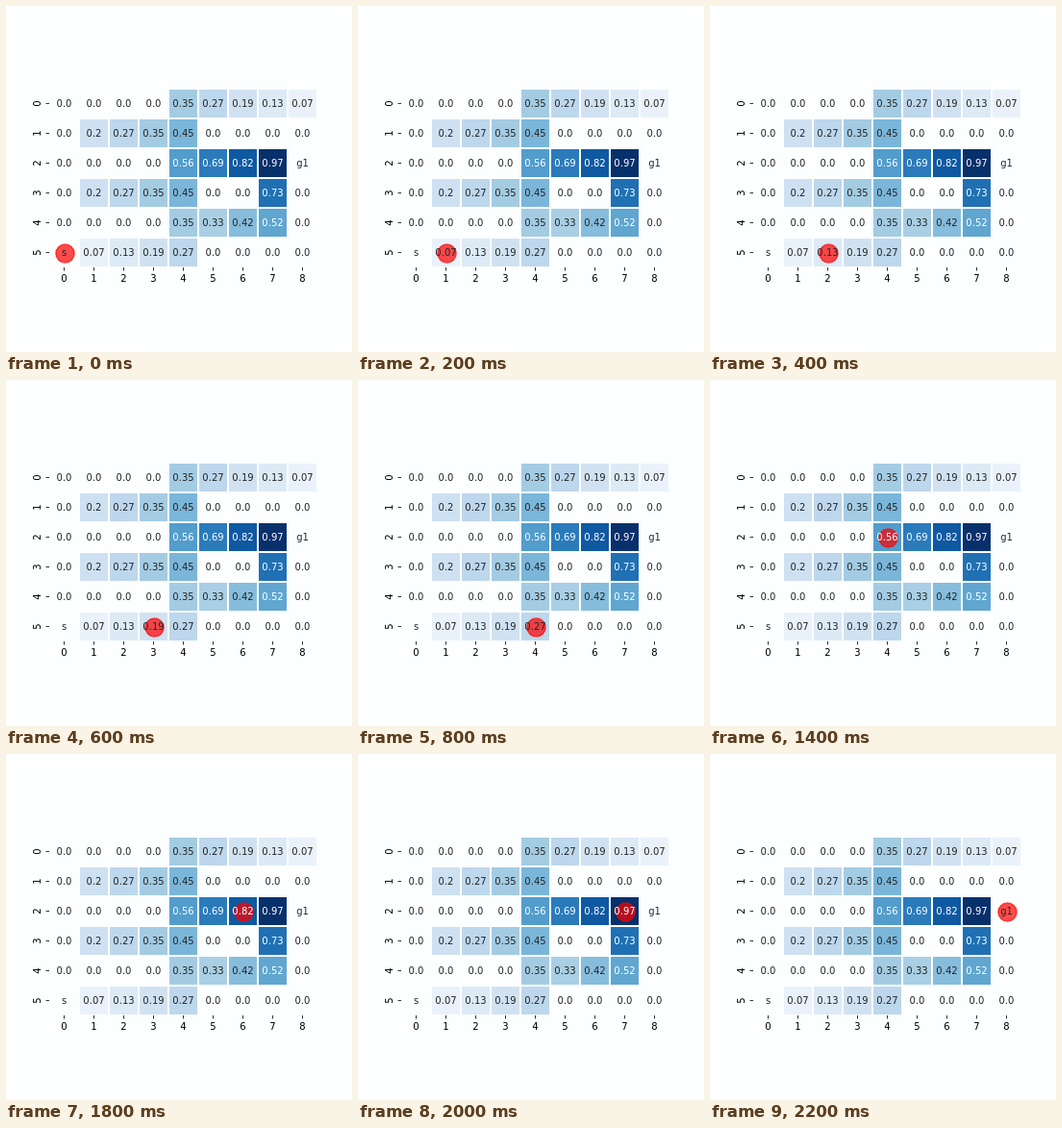
These frames come from a looping animation (360x360 px, 2400 ms). An HTML page:

```html
<!DOCTYPE html>
<html lang="en">
<head>
<meta charset="utf-8">
<title>Grid walk</title>
<style>
  html, body { margin: 0; width: 100%; height: 100%; overflow: hidden; background: #fcfeff; }
  svg { display: block; width: 360px; height: 360px; }
  text { font: 10px "DejaVu Sans", sans-serif; text-anchor: middle; }
</style>
</head>
<body>
<svg id="stage" viewBox="0 0 360 360" xmlns="http://www.w3.org/2000/svg"></svg>
<script>
const LEFT = 45, TOP = 86, CELL = 31, STEP_MS = 200;
const PAPER = '#fcfeff', INK = '#262626';
const stage = document.getElementById('stage');

const grid = `
0.0 0.0 0.0 0.0 0.35 0.27 0.19 0.13 0.07
0.0 0.2 0.27 0.35 0.45 0.0 0.0 0.0 0.0
0.0 0.0 0.0 0.0 0.56 0.69 0.82 0.97 g1
0.0 0.2 0.27 0.35 0.45 0.0 0.0 0.73 0.0
0.0 0.0 0.0 0.0 0.35 0.33 0.42 0.52 0.0
s 0.07 0.13 0.19 0.27 0.0 0.0 0.0 0.0
`.trim().split('\n').map(row => row.split(' '));

const blues = ['f7fbff', 'deebf7', 'c6dbef', '9ecae1', '6baed6', '4292c6', '2171b5', '08519c', '08306b']
  .map(hex => [0, 2, 4].map(i => parseInt(hex.slice(i, i + 2), 16)));

function shade(value) {
  const pos = value / 0.97 * (blues.length - 1);
  const i = Math.min(Math.floor(pos), blues.length - 2);
  const mix = blues[i].map((c, k) => Math.round(c + (blues[i + 1][k] - c) * (pos - i)));
  return `rgb(${mix.join(',')})`;
}

function add(tag, attrs, text = '') {
  const node = document.createElementNS(stage.namespaceURI, tag);
  for (const name in attrs) node.setAttribute(name, attrs[name]);
  node.textContent = text;
  return stage.appendChild(node);
}

const midX = col => LEFT + (col + 0.5) * CELL;
const midY = row => TOP + (row + 0.5) * CELL;

grid.forEach((row, r) => row.forEach((label, c) => {
  const value = parseFloat(label) || 0;
  if (value) {
    add('rect', { x: LEFT + c * CELL + 1, y: TOP + r * CELL + 1, width: CELL - 2, height: CELL - 2, fill: shade(value) });
  }
}));

const walker = add('circle', {
  r: 9.6, fill: '#f00', 'fill-opacity': 0.7,
  stroke: '#f00', 'stroke-width': 1.4, 'stroke-opacity': 0.7
});

// Labels sit above the walker.
grid.forEach((row, r) => row.forEach((label, c) => {
  add('text', { x: midX(c), y: midY(r) + 3.5, fill: parseFloat(label) > 0.5 ? PAPER : INK }, label);
}));

const bottom = TOP + grid.length * CELL;
for (let c = 0; c < grid[0].length; c++) {
  add('rect', { x: midX(c) - 0.5, y: bottom, width: 1, height: 3.5, fill: '#000', opacity: 0.8 });
  add('text', { x: midX(c), y: bottom + 15 }, c);
}
for (let r = 0; r < grid.length; r++) {
  add('rect', { x: LEFT - 3.5, y: midY(r) - 0.5, width: 3.5, height: 1, fill: '#000', opacity: 0.8 });
  add('text', { transform: `translate(36 ${midY(r)}) rotate(-90)` }, r);
}

// Four cells right, three up, four right.
const path = Array.from({ length: 12 }, (_, i) => [
  Math.min(i, 4) + Math.max(i - 7, 0),
  5 - Math.min(Math.max(i - 4, 0), 3)
]);

function draw(ms) {
  const [col, row] = path[Math.floor(ms / STEP_MS) % path.length];
  walker.setAttribute('cx', midX(col) + 1);
  walker.setAttribute('cy', midY(row) + 1);
}

const start = performance.now();
function tick() {
  draw(performance.now() - start);
  requestAnimationFrame(tick);
}
tick();
</script>
</body>
</html>
```
